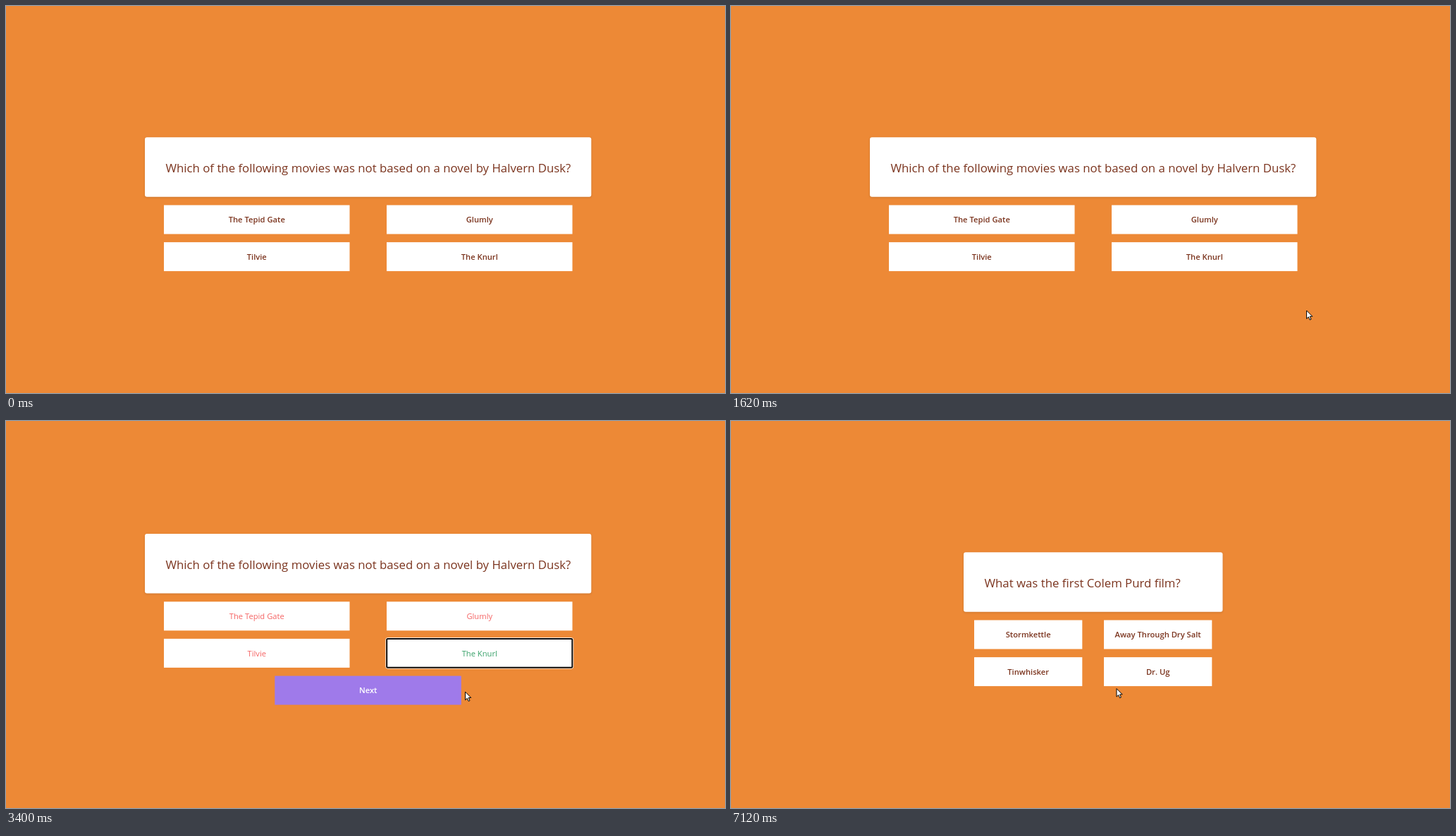
An HTML page that plays this animation: 1020x549 px, repeating every 8 s.

```html
<!DOCTYPE html>
<html lang="en">
<head>
<meta charset="utf-8">
<title>Film quiz</title>
<style>
  html, body { margin: 0; width: 100%; height: 100%; overflow: hidden; background: #ed8936; }
  svg { display: block; width: 100%; height: 100%; }
  text { font-family: "Open Sans", "Noto Sans", sans-serif; font-size: 11.2px; font-weight: 600; fill: #7b341e; }
  .question { font-size: 16.8px; font-weight: 400; }
  .middle { text-anchor: middle; }
  .wrong { font-weight: 400; fill: #f56565; }
  .right { font-weight: 400; fill: #38a169; }
  .next { fill: #fff; }
  .card { fill: #fff; filter: drop-shadow(0 1.5px 1.5px rgba(0, 0, 0, .14)); }
  .cursor { fill: #fff; stroke: #000; stroke-width: 1; stroke-linejoin: round; }
</style>
</head>
<body>
<svg id="stage" viewBox="0 0 1020 549"></svg>
<script>
const LOOP = 8000;
const stage = document.getElementById('stage');

const quiz = [
  {
    question: 'Which of the following movies was not based on a novel by Halvern Dusk?',
    answers: ['The Tepid Gate', 'Glumly', 'Tilvie', 'The Knurl'],
    correct: 3, cardX: 197, cardWidth: 633.3, columns: [224, 540], width: 263.5
  },
  {
    question: 'What was the first Colem Purd film?',
    answers: ['Stormkettle', 'Away Through Dry Salt', 'Tinwhisker', 'Dr. Ug'],
    correct: 3, cardX: 330, cardWidth: 367.5, columns: [345, 529], width: 153.3
  }
];

const ARROW = 'M.5 .6V12.2L3.2 9.7 5 13.8 6.9 13 5.1 8.9H8.7Z';
const HAND = 'M-.5 10.5V1.8a1.3 1.3 0 0 1 2.6 0V6.2q1.2-.9 2 .4 1.2-.8 1.9.5 1.7-.3 1.7 1.4v3' +
  'q0 2-1.5 3.2v1.8H.7v-1.6Q-1 13-2.4 11-4 9.3-4.1 8.6-3.5 7.4-2.2 8.2Z';

const rect = (x, y, w, h, attrs) => `<rect x="${x}" y="${y}" width="${w}" height="${h}" ${attrs}/>`;
const label = (x, y, text, cls) => `<text x="${x}" y="${y}" class="${cls}">${text}</text>`;

function focusRing(x, y, w) {
  return rect(x - 1.2, y - 1.2, w + 2.4, 43.4, 'rx="2.5" fill="none" stroke="#fff"') +
    rect(x + .2, y + .2, w - .4, 40.6, 'rx="1.5" fill="none" stroke="#101010" stroke-width="2"');
}

function drawQuiz({ question, answers, correct, cardX, cardWidth, columns, width }, focused, answered) {
  const top = answered ? 160 : 186.2;
  let out = rect(cardX, top, cardWidth, 84.5, 'rx="3" class="card"') +
    label(cardX + 29.5, top + 49.8, question, 'question');
  answers.forEach((answer, i) => {
    const x = columns[i % 2];
    const y = top + 96.3 + 52.6 * (i >> 1);
    const verdict = !answered ? '' : i === correct ? 'right' : 'wrong';
    out += rect(x, y, width, 41, 'fill="#fff"');
    if (focused && i === correct) out += focusRing(x, y, width);
    out += label(x + width / 2, y + 24.8, answer, `middle ${verdict}`);
  });
  if (answered) {
    out += rect(381.3, 361.6, 264.5, 41, 'fill="#9f7aea"') + label(513.7, 386.3, 'Next', 'middle next');
  }
  return out;
}

// Each move: first and last change, intervals from `from` to `to`, and the interval shown first.
const moves = [
  { start: 1080, end: 1860, first: 0, last: 7, from: [996.5, 543], to: [699, 359] },
  { start: 1970, end: 1970, first: 1, last: 1, from: [699, 359], to: [692, 357] },
  { start: 2760, end: 3170, first: 1, last: 5, from: [692, 357], to: [659, 383] },
  { start: 3400, end: 3950, first: 1, last: 6, from: [659, 383], to: [552, 379], sag: 4 },
  { start: 7120, end: 7120, first: 1, last: 1, from: [552, 379], to: [546.5, 379] }
];

function cursorAt(t) {
  const move = moves.filter(m => t >= m.start).pop();
  if (!move) return null;
  const { start, end, first, last, from, to, sag = 0 } = move;
  const interval = (end - start) / (last - first) || 1;
  const u = Math.min(last, first + Math.floor((t - start) / interval + .001)) / last;
  const eased = u * u * (3 - 2 * u);
  return [
    from[0] + (to[0] - from[0]) * eased,
    from[1] + (to[1] - from[1]) * eased + sag * Math.sin(Math.PI * eased)
  ];
}

function drawCursor(t) {
  const point = cursorAt(t);
  if (!point) return '';
  const [x, y] = point;
  const overAnswer = t < 2760 && x > 540 && x < 803 && y > 335 && y < 376;
  const overNext = t >= 2300 && t < 4290 && x < 646 && y > 361;
  const path = overAnswer || overNext ? HAND : ARROW;
  return `<path class="cursor" transform="translate(${x} ${y})" d="${path}"/>`;
}

function drawClick(t) {
  const spot = (x, y, alpha) => `<circle cx="${x}" cy="${y}" r="9" fill="#fff000" opacity="${alpha}"/>`;
  if (t >= 2180 && t < 2300) return spot(691.5, 357, .7);
  if (t >= 4180 && t < 4290) return spot(551.5, 379.5, .52);
  return '';
}

function drawTooltip(t) {
  if (t < 430 || t >= 1190) return '';
  const opacity = t < 540 ? .5 : t < 1080 ? 1 : .75;
  return `<g opacity="${opacity}">` + rect(1000.5, 537.5, 30, 20, 'fill="#fff" stroke="#d8cfc8"') +
    '<text x="1004.5" y="551" style="font-size:9px;font-weight:400;fill:#575757">Dur</text></g>';
}

function scene(t) {
  return drawQuiz(quiz[t < 4290 ? 0 : 1], t >= 2180 && t < 4290, t >= 2300 && t < 4290) +
    drawTooltip(t) + drawClick(t) + drawCursor(t);
}

let shown = '';
const began = performance.now();
function frame() {
  const markup = scene((performance.now() - began) % LOOP);
  if (markup !== shown) stage.innerHTML = shown = markup;
  requestAnimationFrame(frame);
}
frame();
</script>
</body>
</html>
```
